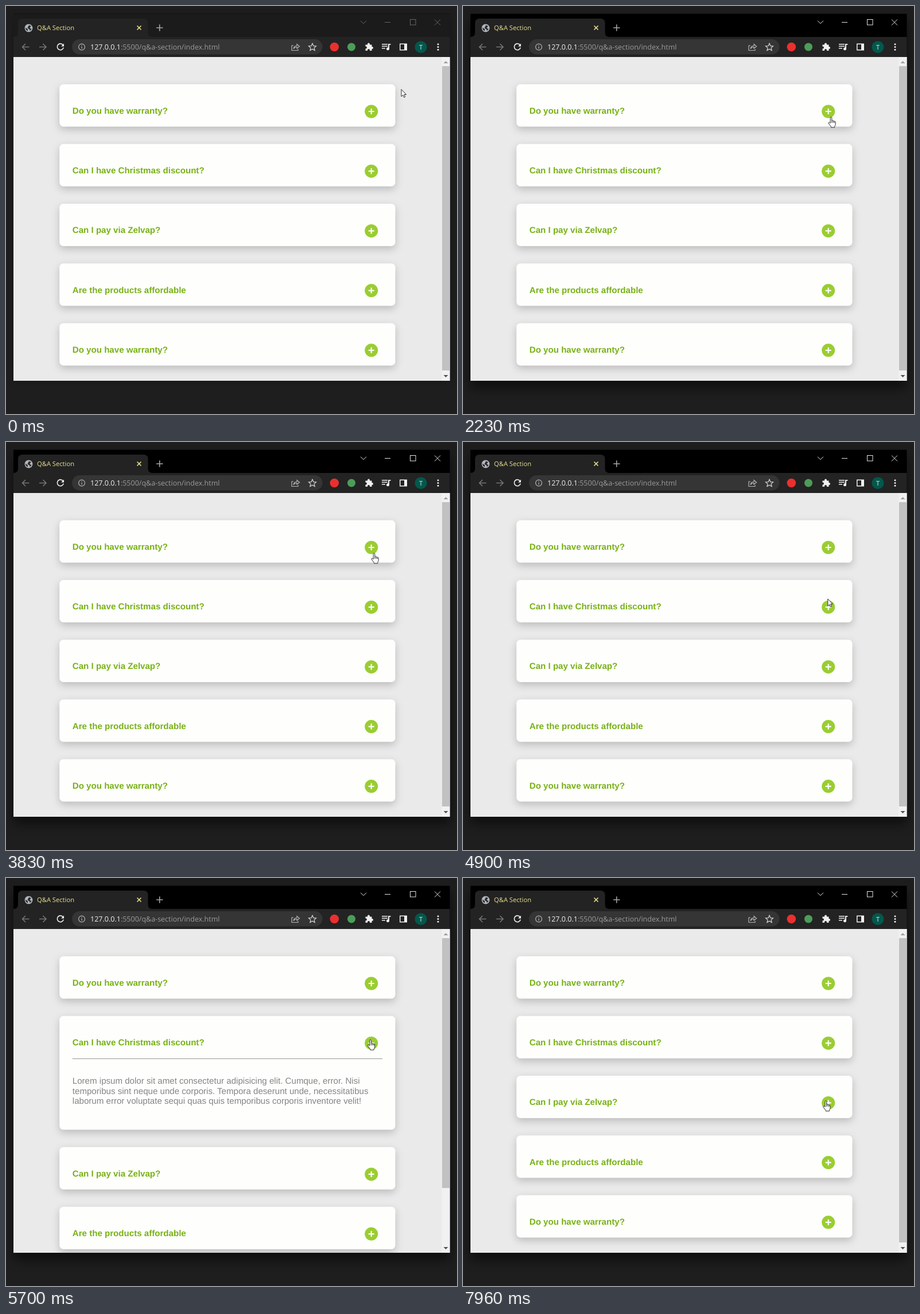
An HTML page that plays this animation: 786 by 712 pixels, repeating every 8 s.

```html
<!DOCTYPE html>
<html lang="en">
<head>
<meta charset="utf-8">
<title>Q&amp;A Section</title>
<style>
  html, body { margin: 0; width: 100%; height: 100%; overflow: hidden; background: #1e1e1e; }
  svg { display: block; width: 100vw; height: 100vh; text-rendering: geometricPrecision; }
  .ui { font-family: "Open Sans", "Noto Sans", sans-serif; }
  .page { font-family: "Liberation Sans", Arial, sans-serif; font-size: 15.1px; }
  .line { fill: none; stroke-width: 1.6; }
  .frame { fill: #1b1b1b; filter: drop-shadow(0 3px 6px rgba(0,0,0,.25)); }
  .controls { fill: none; stroke: #666; stroke-width: 1; }
  .active .frame { fill: #000; filter: drop-shadow(0 12px 10px rgba(0,0,0,.55)); }
  .active .controls { stroke: #e4e4e4; }
  .card { fill: #fefefd; filter: drop-shadow(0 5px 7px rgba(0,0,0,.2)); }
  .question { font-weight: bold; fill: #78b215; }
  .answer { fill: #858585; }
  .cursor { fill: #fff; stroke: #2b2b33; stroke-width: 1; stroke-linejoin: round; }
</style>
</head>
<body>
<svg id="stage" viewBox="0 0 786 712">
  <defs><clipPath id="view"><rect x="13" y="89" width="746.5" height="565"/></clipPath></defs>
  <rect width="786" height="712" fill="#1e1e1e"/>
  <rect class="frame" x="13" y="14" width="760.5" height="640"/>
  <path d="M13 13.5H773" stroke="#121212"/>

  <!-- tab strip and toolbar -->
  <path d="M13 54Q21 54 21 46V30Q21 22 29 22H239.500Q247.500 22 247.500 30V46Q247.500 54 255 54H773.500V89H13Z" fill="#232323"/>
  <rect x="115" y="58" width="436.500" height="26.500" rx="13.250" fill="#353535"/>
  <g class="ui">
    <text x="54" y="42.300" font-size="11.2" fill="#eae28c">Q&amp;A Section</text>
    <text x="147" y="76" font-size="12.500" fill="#9b9b9b"><tspan fill="#f2f2f2">127.0.0.1</tspan>:5500/q&amp;a-section/index.html</text>
  </g>
  <circle cx="39.500" cy="38.500" r="6.900" fill="#b3b7bb"/>
  <path d="M34 37.500L38 40.500V43.500Q34 42.500 34 37.500ZM40 33.500L44 35L41.500 37.500L43 40L45 39.500L42 43.500L41 41L37.500 38.500L38.500 36Z" fill="#2b2c2e"/>
  <path class="line" d="M228.500 34.500L235.500 41.500M235.500 34.500L228.500 41.500" stroke="#eae28c"/>
  <path class="line" d="M262 38H273.500M267.700 32.300V43.800" stroke="#a6a6a6"/>
  <g class="controls">
    <path d="M618 25.700L623 30.700L628 25.700M660 28.500H670M747 23.500L757 33.500M757 23.500L747 33.500"/>
    <rect x="704.500" y="23.500" width="9.500" height="9.500"/>
  </g>
  <path class="line" d="M40.500 71.500H28.500M34 66L28.500 71.500L34 77M58 71.500H70M64.500 66L70 71.500L64.500 77" stroke="#757575"/>
  <path class="line" d="M99.500 68.200A5.500 5.500 0 1 0 100.200 72.500" stroke="#f0f0f0"/>
  <path d="M101 65.500V70.500H96Z" fill="#f0f0f0"/>
  <g class="line" stroke="#b5b5b5" style="stroke-width:1.2">
    <circle cx="132" cy="71.500" r="5.400"/>
    <path d="M132 70.700V74.600M132 68.300V69.600"/>
    <path d="M501 69H498V77.500H509V75M501 74.500Q502 69.500 507 69.500V66.500L511.500 70.500L507 74V71.500Q503.500 71.500 501 74.500Z"/>
    <path d="M534 65.300L535.900 69.600L540.500 70L537 73.100L538.100 77.600L534 75.200L529.900 77.600L531 73.100L527.500 70L532.100 69.600Z" stroke="#d8d8d8"/>
  </g>
  <circle cx="572.300" cy="71.500" r="7.800" fill="#e9302f"/>
  <circle cx="602" cy="71.500" r="7" fill="#4c9d58"/>
  <g fill="#f0f0f0">
    <path d="M626.500 67.500H630V66.500A2 2 0 0 1 634 66.500V67.500H637.500V71H638A2 2 0 0 1 638 75H637.500V78H634V77A2 2 0 0 0 630 77V78H626.500V74.500H627A2 2 0 0 0 627 70.500H626.500Z"/>
    <path d="M655 66H665V67.500H655ZM655 69.500H665V71H655ZM655 73H661V74.500H655ZM666 66H670.500V67.700H668V74.500A2.500 2.500 0 1 1 666 72.300Z"/>
    <path d="M686 65.500H699V77.500H686ZM687.500 67V76H694V67Z" fill-rule="evenodd"/>
    <circle cx="753" cy="66.800" r="1.500"/><circle cx="753" cy="71.500" r="1.500"/><circle cx="753" cy="76.200" r="1.500"/>
  </g>
  <circle cx="723" cy="71.700" r="10.500" fill="#02584c"/>
  <text class="ui" x="723" y="75.700" font-size="11" text-anchor="middle" fill="#e3efed">T</text>

  <!-- page -->
  <rect x="13" y="89" width="760.500" height="565" fill="#eaeaea"/>
  <g id="cards" class="page" clip-path="url(#view)"></g>
  <rect x="759.500" y="89" width="14" height="565" fill="#f1f1f1"/>
  <rect id="thumb" x="760" y="105" width="13" fill="#c1c1c1"/>
  <path d="M762.500 100L766.500 96L770.500 100Z" fill="#a0a0a0"/>
  <path d="M762.500 644L766.500 648L770.500 644Z" fill="#505050"/>

  <path id="arrow" class="cursor" d="M.5 .5V13L3.400 10.300L5.200 14.500L7.200 13.600L5.400 9.500H9Z"/>
  <path id="hand" class="cursor" d="M-1 2Q-1 .6 .3 .6T1.600 2V6.800Q3.200 5.800 4 7.200Q5.500 6.600 6.100 8Q7.900 7.600 8 9.400V13Q7.700 15.500 6.400 17V18.500H.2V17.200L-4 11.600Q-4.800 10 -3.600 9.600Q-2.600 9.300 -1 11.200ZM1.600 7V10.500M4 7.500V10.500M6.100 8.200V10.800"/>
</svg>
<script>
const LOOP = 8000;
const TOP = 136.6, PITCH = 104.2, CLOSED = 74, OPEN = 198.5;
const BUTTON = { x: 636.7, y: 47.4, r: 11.5 };

const questions = [
  "Do you have warranty?",
  "Can I have Christmas discount?",
  "Can I pay via Zelvap?",
  "Are the products affordable",
  "Do you have warranty?"
];
const answer = [
  "Lorem ipsum dolor sit amet consectetur adipisicing elit. Cumque, error. Nisi",
  "temporibus sint neque unde corporis. Tempora deserunt unde, necessitatibus",
  "laborum error voluptate sequi quas quis temporibus corporis inventore velit!"
];

// [time, index of the open card or -1]
const toggles = [
  [0, -1], [2130, 0], [2230, -1], [2400, 0], [3830, -1],
  [5400, 1], [5530, -1], [5700, 1], [7030, -1]
];
const ACTIVATED = 2130;

// Pointer hotspot; bow bends the path sideways
const start = { x: 688.5, y: 145 };
const moves = [
  { from: 640, to: 1460, x: 643.5, y: 178.3, bow: 0 },
  { from: 1470, to: 1560, x: 641.2, y: 193.3, bow: 0 },
  { from: 4400, to: 5060, x: 634.7, y: 281.6, bow: 0 },
  { from: 7330, to: 7960, x: 632, y: 388.3, bow: -5 }
];

const $ = id => document.getElementById(id);
const stage = $("stage"), thumb = $("thumb"), arrow = $("arrow"), hand = $("hand");

$("cards").innerHTML = questions.map(question => `
  <g>
    <rect class="card" x="93.2" width="585.3" rx="7"/>
    <text class="question" x="115.8" y="51.4">${question}</text>
    <circle cx="${BUTTON.x}" cy="${BUTTON.y}" r="${BUTTON.r}" fill="#9acd32"/>
    <path d="M631.700 ${BUTTON.y}h10" stroke="#fff" stroke-width="2.2"/>
    <path class="upright" d="M${BUTTON.x} 42.4v10" stroke="#fff" stroke-width="2.2"/>
    <g class="body">
      <path d="M115.800 74.500H656" stroke="#929292"/>
      ${answer.map((line, i) => `<text class="answer" x="115.800" y="${118.6 + i * 17.4}">${line}</text>`).join("")}
    </g>
  </g>`).join("");

const cards = [...$("cards").children].map(group => ({
  group,
  rect: group.querySelector(".card"),
  upright: group.querySelector(".upright"),
  body: group.querySelector(".body")
}));

const show = (node, visible) => node.style.display = visible ? "" : "none";
const place = (node, x, y) => node.setAttribute("transform", `translate(${x} ${y})`);
const ease = p => p * p * p * (p * (p * 6 - 15) + 10);

function pointerAt(t) {
  let { x, y } = start;
  for (const move of moves) {
    const p = Math.min(1, Math.max(0, (t - move.from) / (move.to - move.from)));
    const e = ease(p);
    x += (move.x - x) * e + move.bow * Math.sin(Math.PI * e);
    y += (move.y - y) * e;
  }
  return { x, y };
}

function draw(t) {
  const open = toggles.findLast(([time]) => time <= t)[1];
  const pointer = pointerAt(t);
  let overButton = false;

  cards.forEach((card, i) => {
    const isOpen = i === open;
    const top = TOP + i * PITCH + (open >= 0 && i > open ? OPEN - CLOSED : 0);
    place(card.group, 0, top);
    card.rect.setAttribute("height", isOpen ? OPEN : CLOSED);
    show(card.upright, !isOpen);
    show(card.body, isOpen);
    overButton ||= Math.abs(pointer.x - BUTTON.x) < BUTTON.r
      && Math.abs(pointer.y - top - BUTTON.y) < BUTTON.r;
  });

  thumb.setAttribute("height", open < 0 ? 531 : 436);
  stage.classList.toggle("active", t >= ACTIVATED);
  show(arrow, !overButton);
  show(hand, overButton);
  place(overButton ? hand : arrow, pointer.x, pointer.y);
}

const began = performance.now();
function tick() {
  draw((performance.now() - began) % LOOP);
  requestAnimationFrame(tick);
}
tick();
</script>
</body>
</html>
```
